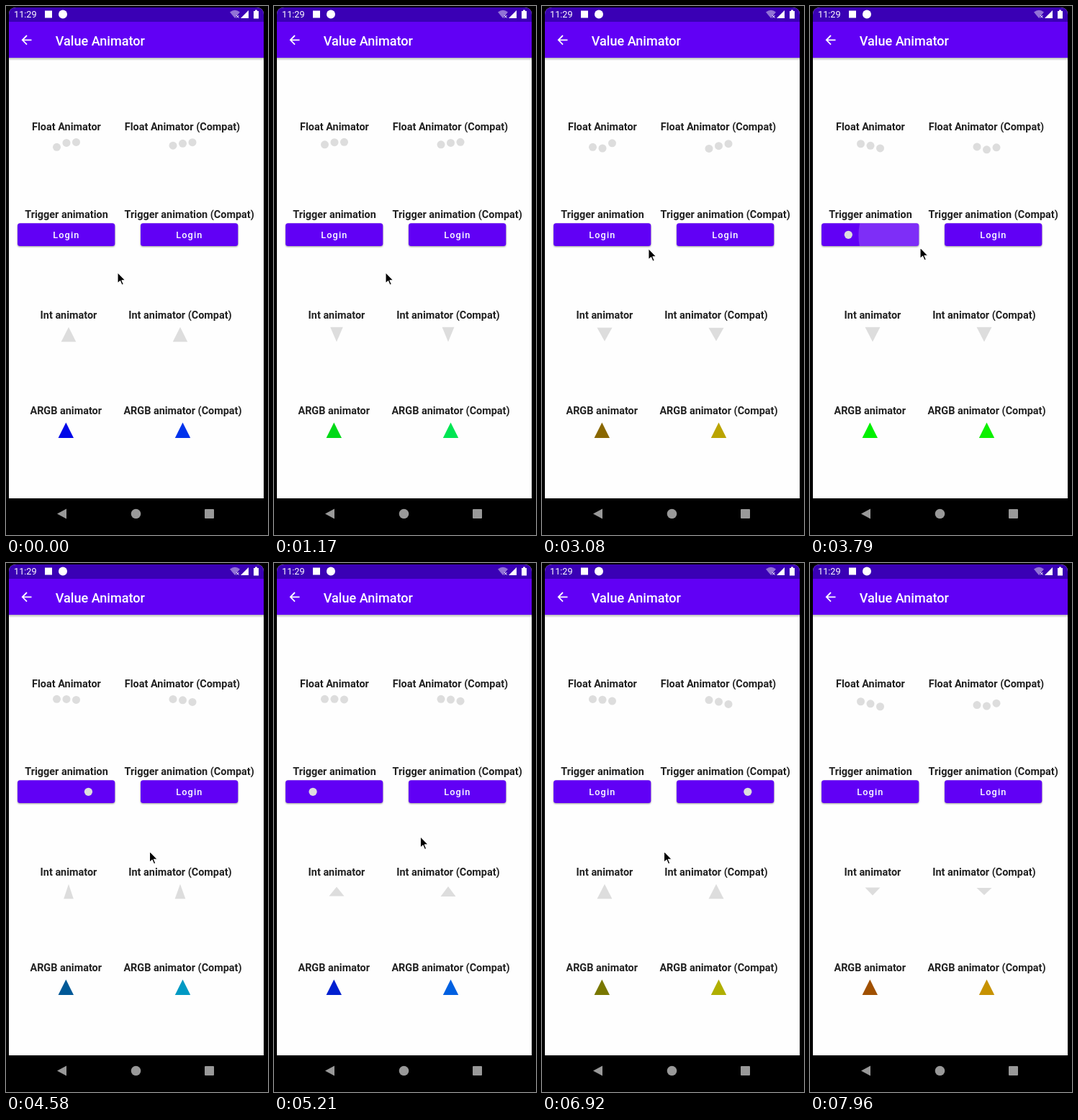
An HTML page for the animation above (8000 ms loop, 364 by 736 pixels).

```html
<!DOCTYPE html>
<html lang="en">
<head>
<meta charset="utf-8">
<title>Value Animator</title>
<style>
  html, body { margin: 0; width: 100%; height: 100%; overflow: hidden; background: #000; }
  svg { display: block; width: 364px; height: 736px; font-family: Roboto, sans-serif; }
  .title { font-size: 18.1px; font-weight: 500; fill: #fff; }
  .clock { font-size: 12.7px; fill: #fff; }
  .label { font-size: 14.45px; font-weight: 700; fill: #212121; text-anchor: middle; }
  .login { font-size: 12.74px; font-weight: 500; letter-spacing: .0893em; fill: #fff; }
  .button { fill: #6100f5; filter: drop-shadow(0 1px 1px #0006); }
</style>
</head>
<body>
<svg viewBox="0 0 364 736">
  <defs>
    <clipPath id="screen"><path d="M4 685V12Q4 2 14 2H348Q358 2 358 12V685Z"/></clipPath>
    <linearGradient id="shade" x2="0" y2="1">
      <stop stop-color="#000" stop-opacity=".28"/>
      <stop offset="1" stop-color="#000" stop-opacity="0"/>
    </linearGradient>
  </defs>
  <rect width="364" height="736"/>
  <g clip-path="url(#screen)">
    <rect x="4" y="2" width="354" height="683" fill="#fefefe"/>
    <rect x="4" y="72" width="354" height="4" fill="url(#shade)"/>
    <rect x="4" y="22" width="354" height="50" fill="#6100f5"/>
    <rect x="4" y="2" width="354" height="20" fill="#3a00b5"/>
  </g>
  <text class="clock" x="11" y="16">11:29</text>
  <g fill="#fff">
    <rect x="54" y="6.5" width="10" height="10"/>
    <circle cx="79" cy="11.5" r="6"/>
    <path d="M311 8.5Q318 3 325 8.5L318 17Z" opacity=".45"/>
    <path d="M337 6V17H326Z"/>
    <path d="M344 7h2V5.5h3V7h2V17.500h-7Z"/>
  </g>
  <path d="M320 13l3.500 3.500m0-3.500l-3.500 3.500" stroke="#fff"/>
  <path d="M35.500 47.300H23M29 41L22.800 47.300 29 53.600" fill="none" stroke="#fff" stroke-width="1.800"/>
  <text class="title" x="68.700" y="54.500">Value Animator</text>
  <g id="stage"></g>
  <g fill="#999">
    <path d="M84 699.500V713.500L71 706.500Z"/>
    <circle cx="180.500" cy="706.500" r="6.800"/>
    <rect x="276" y="700" width="13" height="13" rx="1"/>
  </g>
  <path id="cursor" d="M0 0V15.500L3.600 12.200 6 17.800 8.400 16.800 6 11.300H11Z" stroke="#fff" stroke-width="1.100" stroke-linejoin="round"/>
</svg>
<script>
  const LOOP = 8000, SPIN = 2500, SPIN_DELAY = 43, BOUNCE = 600, STAGGER = 70, PASS = 800;
  const stage = document.getElementById('stage');
  const cursor = document.getElementById('cursor');

  function add(tag, attrs, text = '', parent = stage) {
    const el = document.createElementNS('http://www.w3.org/2000/svg', tag);
    for (const key in attrs) el.setAttribute(key, attrs[key]);
    el.textContent = text;
    parent.append(el);
    return el;
  }
  const set = (el, attrs) => { for (const key in attrs) el.setAttribute(key, attrs[key]); };
  const mod = (a, n) => ((a % n) + n) % n;
  const clamp = v => Math.max(0, Math.min(1, v));
  const ease = p => (1 - Math.cos(Math.PI * p)) / 2;

  [
    ['Float Animator', 84, 172.5], ['Float Animator (Compat)', 245, 172.5],
    ['Trigger animation', 84, 294.5], ['Trigger animation (Compat)', 254.7, 294.5],
    ['Int animator', 87, 434.7], ['Int animator (Compat)', 242, 434.7],
    ['ARGB animator', 83.2, 567.5], ['ARGB animator (Compat)', 245.5, 567.5]
  ].forEach(([text, x, y]) => add('text', { class: 'label', x, y }, text));

  // Bouncing dots: drop below the top position for a cycle fraction u
  const slowRise = u => 10.5 * (u < .55 ? (1 - u / .55) ** 2 : ((u - .55) / .45) ** 5.5);
  const evenBounce = u => 11 * (1 - Math.sin(Math.PI * u));
  const dotRows = [
    { x: 70.5, lead: 580, drop: slowRise },
    { x: 232, lead: 487, drop: evenBounce }
  ];
  for (const row of dotRows) {
    row.dots = [0, 1, 2].map(i => add('circle', { cx: row.x + 13.5 * i, r: 5.5, fill: '#ddd' }));
  }

  function drawDots(t) {
    for (const { dots, lead, drop } of dotRows) {
      dots.forEach((dot, i) => {
        const u = mod(t + lead - STAGGER * i, BOUNCE) / BOUNCE;
        dot.setAttribute('cy', 189.3 + drop(u));
      });
    }
  }

  // Login buttons: ripple on press, then one dot travels right and back
  const buttons = [
    { x: 16, start: 3710, touch: 145 },
    { x: 187, start: 6180, touch: 213 }
  ];
  buttons.forEach((b, i) => {
    const box = { x: b.x, y: 302.3, width: 135.3, height: 31.7, rx: 3.5 };
    add('rect', { class: 'button', ...box });
    add('rect', box, '', add('clipPath', { id: 'clip' + i }));
    b.ripple = add('circle', { cx: b.touch, cy: 319, fill: '#fff', 'clip-path': `url(#clip${i})` });
    b.text = add('text', { class: 'login', x: b.x + 49.2, y: 323.4 }, 'Login');
    b.dot = add('circle', { cy: 318.3, r: 5.6, fill: '#ddd' });
  });

  function drawButtons(t) {
    for (const b of buttons) {
      const age = t - b.start;
      const busy = age >= 0 && age < 2 * PASS;
      const swing = ease(age / PASS) * 2 - 1;
      set(b.text, { opacity: busy ? 0 : 1 });
      set(b.dot, { opacity: busy ? 1 : 0, cx: b.x + 67.7 + 32 * swing });
      const press = age + 80;
      set(b.ripple, {
        r: 135 * clamp(press / 280),
        opacity: press < 0 ? 0 : .18 * clamp((460 - press) / 220)
      });
    }
  }

  // Grey triangles flip over X, Y, X, Y in turn
  const spinners = [[87, 35], [242, 48]].map(([x, delay]) => ({
    x, delay, el: add('path', { d: 'M0-10.300L10.500 10.300H-10.500Z', fill: '#ddd' })
  }));

  function drawSpinners(t) {
    for (const { x, delay, el } of spinners) {
      const step = mod(t - delay, SPIN) / SPIN * 4;
      const turn = Math.cos(Math.PI * (step % 1));
      const sx = step < 1 ? 1 : step < 2 ? Math.abs(turn) : step < 3 ? 1 : Math.abs(turn);
      const sy = step < 1 ? turn : step < 2 ? -1 : step < 3 ? -turn : 1;
      el.setAttribute('transform', `translate(${x} 457)scale(${sx} ${sy})`);
    }
  }

  // Red, green, blue and back; the second one blends in linear light
  const tints = [[83.3, 1], [245.5, 1 / 2.2]].map(([x, gamma]) => ({
    gamma, el: add('path', { d: `M${x} 579.500l10.700 21.500h-21.400Z` })
  }));

  function drawTints(t) {
    const s = Math.abs(mod(t - SPIN_DELAY, 2 * SPIN) / SPIN * 2 - 2);
    for (const { gamma, el } of tints) {
      const rgb = [0, 1, 2].map(c => Math.round(240 * clamp(1 - Math.abs(s - c)) ** gamma));
      el.setAttribute('fill', `rgb(${rgb})`);
    }
  }

  // Pointer path: time, x, y
  const path = [
    [0, 155, 370.5], [1500, 155, 370.5], [2100, 155, 365], [2700, 155, 365],
    [3300, 145, 326], [3680, 145, 326], [3790, 153, 336], [4200, 199.500, 401],
    [5000, 199.500, 401], [5600, 213.500, 327], [6220, 213.500, 327],
    [6700, 169.500, 401], [LOOP, 169.500, 401]
  ];

  function drawCursor(t) {
    const i = path.findIndex(p => p[0] > t);
    const [t0, x0, y0] = path[i - 1], [t1, x1, y1] = path[i];
    const k = ease((t - t0) / (t1 - t0));
    set(cursor, {
      transform: `translate(${x0 + (x1 - x0) * k} ${y0 + (y1 - y0) * k})`,
      opacity: t < 7650 ? 1 : 0
    });
  }

  function frame() {
    const t = performance.now() % LOOP;
    drawDots(t);
    drawButtons(t);
    drawSpinners(t);
    drawTints(t);
    drawCursor(t);
    requestAnimationFrame(frame);
  }
  frame();
</script>
</body>
</html>
```
